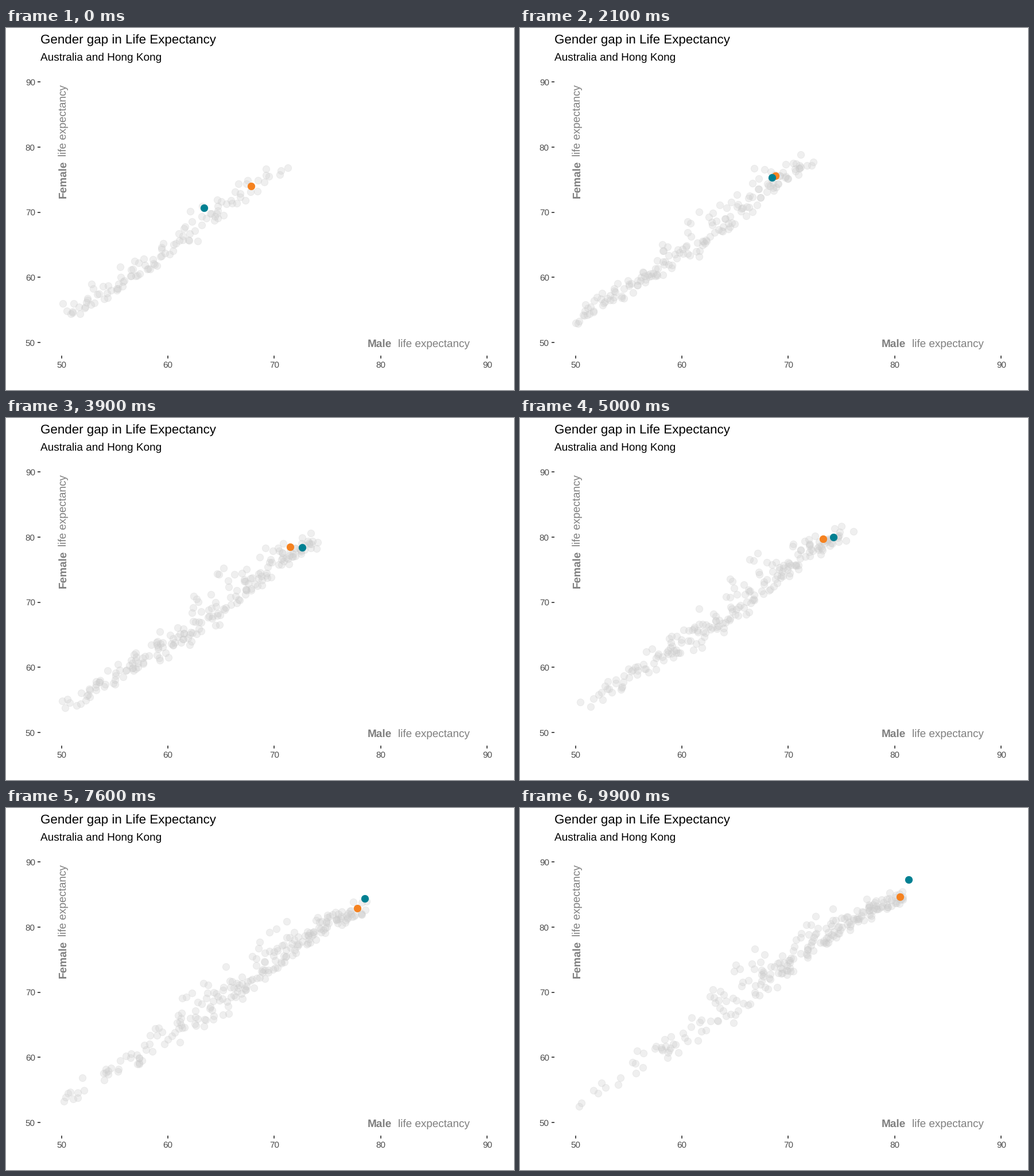
Animation of 885 by 632 pixels, one loop 10 s. Source, as a matplotlib script:

```python
import numpy as np
import matplotlib.pyplot as plt
from matplotlib.animation import FuncAnimation

W, H, DPI = 885, 632, 64
FRAMES, INTERVAL = 100, 100
PT = 72 / DPI  # points per pixel
COUNT = 230

plt.rcParams["font.family"] = "Liberation Sans"
plt.rcParams["text.hinting"] = "none"
rng = np.random.default_rng(5)


def px(male):
    return 96.7 + (male - 50) * 18.54


def py(female):
    return 549.2 - (female - 50) * 11.38


def bell(x, mid, width):
    return np.exp(-((x - mid) / width) ** 2)


# Key points of the two highlighted paths, in years of life
KEYS = [0, 12, 29, 39, 61, 76, 99]
AUSTRALIA = ([67.8, 67.65, 69.77, 71.5, 75, 77.8, 80.5],
             [74, 74.3, 76.75, 78.5, 80.9, 82.85, 84.6])
HONG_KONG = ([63.4, 66.85, 69.87, 72.6, 75.85, 78.5, 81.3],
             [70.7, 74, 76.5, 78.4, 81.5, 84.4, 87.3])

# Each grey dot has a place in the ranking, a bias and two slow wobbles
rank = (np.arange(COUNT) + rng.uniform(0, 1, COUNT)) / COUNT
bias = rng.normal(0, 1, COUNT)
bias = np.clip(bias + 0.2 * (bias ** 2 - 1), -2, 2.9)
phase = rng.uniform(0, 2 * np.pi, (2, COUNT))
period = rng.uniform(70, 170, (2, COUNT))


def cloud(f):
    k = f / (FRAMES - 1)
    sway, lift = np.sin(2 * np.pi * f / period + phase)
    s = np.abs(rank + 0.02 * sway)

    # The leaders rise steadily while the rest catch up with them
    top = 69.2 + 11.7 * k + 2.2 * (1 - k) * np.exp(-60 * s)
    male = top - (20 + 19 * np.exp(-4.5 * k)) * s - 10 * s ** 8

    gap = 3.8 - 0.9 * k + 2.6 * bell(male, 70 + 3 * k, 9)
    width = 0.8 + (0.7 + 0.9 * np.sqrt(k)) * bell(male, 64 + 2 * k, 6)
    female = male + gap + width * (0.95 * bias + 0.35 * lift)

    seen = (male >= 50) & (female >= 50.4)
    return np.column_stack([px(male), py(female)])[seen]


def along(path, f):
    male, female = (np.interp(f, KEYS, axis) for axis in path)
    return [(px(male), py(female))]


fig = plt.figure(figsize=(W / DPI, H / DPI), dpi=DPI, facecolor="white")
ax = fig.add_axes([0, 0, 1, 1])
ax.set(xlim=(0, W), ylim=(H, 0))
ax.axis("off")


def label(x, y, s, size, color="black", **kw):
    ax.text(x, y, s, fontsize=size * PT, color=color,
            va="baseline", rotation_mode="anchor", **kw)


def tick(xs, ys):
    ax.plot(xs, ys, color="#1a1a1a", lw=1.5 * PT, solid_capstyle="butt")


label(59.5, 27.5, "Gender gap in Life Expectancy", 22.35)
label(59.7, 57.3, "Australia and Hong Kong", 19)

for v in range(50, 91, 10):
    tick([54.6, 60.2], [py(v)] * 2)
    tick([px(v)] * 2, [571.5, 577.2])
    label(50.8, py(v) + 5.6, str(v), 15.2, "#4d4d4d", ha="right")
    label(px(v), 593, str(v), 15.2, "#4d4d4d", ha="center")

GREY = "#7f7f7f"
label(629.8, 557, "Male", 19, GREY, weight="bold")
label(682.8, 557, "life expectancy", 18.9, GREY)
label(104.7, 297.3, "Female", 19, GREY, weight="bold", rotation=90)
label(104.7, 224.3, "life expectancy", 18.9, GREY, rotation=90)


def dots(color, z, alpha=1):
    return ax.scatter([], [], s=(12.3 * PT) ** 2, c=color, edgecolors=color,
                      linewidths=0.94 * PT, alpha=alpha, zorder=z)


crowd = dots("#cccccc", 4, 0.3)
orange = dots("#f58220", 5)
teal = dots("#008092", 6)


def draw(f):
    crowd.set_offsets(cloud(f))
    orange.set_offsets(along(AUSTRALIA, f))
    teal.set_offsets(along(HONG_KONG, f))
    return crowd, orange, teal


anim = FuncAnimation(fig, draw, frames=FRAMES, interval=INTERVAL, repeat=True)
plt.show()
```
